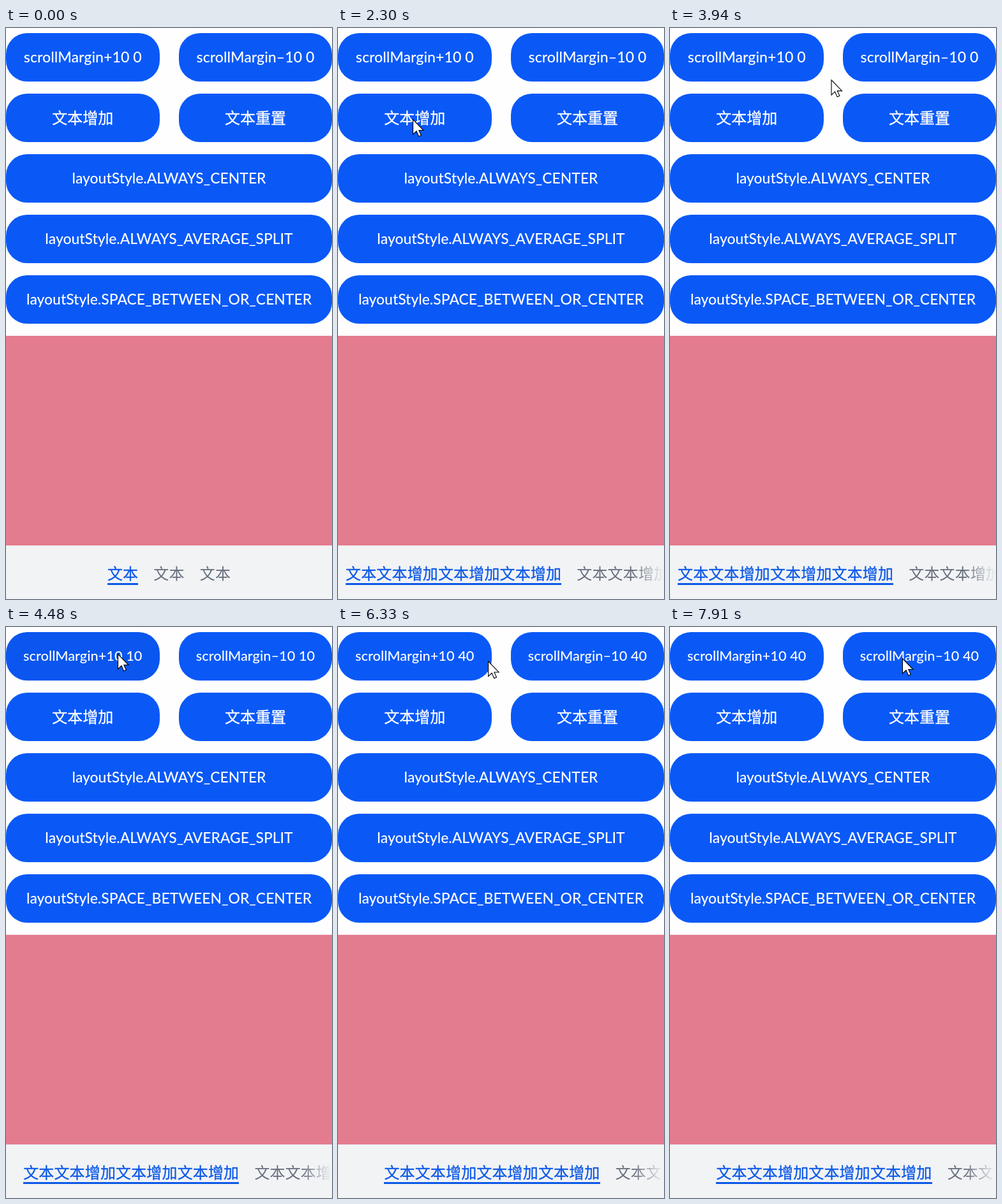
Animation of 511x896 px, one loop 8000 ms. Source, as an HTML page:

```html
<!DOCTYPE html>
<html lang="zh-CN">
<head>
<meta charset="utf-8">
<title>Tab bar demo</title>
<style>
  html, body { margin: 0; width: 100%; height: 100%; overflow: hidden; }
  body { position: relative; background: #fefefe; font: 500 22.9px Lato, "Noto Sans CJK SC", "Noto Sans CJK", sans-serif; }
  .stage { position: absolute; left: 0; top: 0; width: 511px; height: 896px; overflow: hidden; }
  .buttons { position: absolute; top: 7.8px; width: 511px; display: grid; grid-template-columns: 240.5px 240px; column-gap: 30.5px; grid-auto-rows: 76.5px; row-gap: 18.5px; }
  .button { display: flex; align-items: center; justify-content: center; box-sizing: border-box; padding-bottom: 3px; border-radius: 33px; background: #0a59f7; color: #fff; white-space: pre; }
  .wide { grid-column: span 2; }
  .cjk, .tabs { font-family: "Noto Sans CJK SC", "Noto Sans CJK", sans-serif; font-size: 24px; }
  .cjk, .tabs span:first-child { -webkit-text-stroke: .3px; }
  .pressed { background: #0a56ee; }
  .panel { position: absolute; top: 483.3px; width: 511px; height: 329px; background: #e47c90; }
  .bar { position: absolute; top: 812.3px; width: 511px; height: 84px; background: #f1f3f5; overflow: hidden; }
  .bar.scrolls::after { content: ""; position: absolute; right: 0; top: 0; width: 48px; height: 100%; background: linear-gradient(90deg, #f1f3f500, #f1f3f5); }
  .tabs { position: absolute; left: 0; top: 24.7px; display: flex; gap: 24.15px; line-height: 36px; letter-spacing: .15px; white-space: nowrap; color: #666d7b; font-weight: 400; }
  .tabs span { position: relative; }
  .tabs span:first-child { color: #0b58e8; font-weight: 500; }
  .tabs span:first-child::after { content: ""; position: absolute; left: 0; right: 0; top: 34.5px; height: 3px; background: #0b58e8; }
  .cursor { position: absolute; left: 0; top: 0; width: 20px; height: 30px; overflow: visible; }
</style>
</head>
<body>
<div class="stage">
  <div class="buttons">
    <div class="button" id="plus"></div>
    <div class="button" id="minus"></div>
    <div class="button cjk" id="add">文本增加</div>
    <div class="button cjk">文本重置</div>
    <div class="button wide">layoutStyle.ALWAYS_CENTER</div>
    <div class="button wide">layoutStyle.ALWAYS_AVERAGE_SPLIT</div>
    <div class="button wide">layoutStyle.SPACE_BETWEEN_OR_CENTER</div>
  </div>
  <div class="panel"></div>
  <div class="bar" id="bar">
    <div class="tabs" id="tabs"><span></span><span></span><span></span></div>
  </div>
  <svg class="cursor" id="cursor">
    <path d="M.5 .5V24L6 18.8L9.6 27L13.4 25.4L9.8 17.5H17Z" fill="#fff" stroke="#000" stroke-width="1.1"/>
  </svg>
</div>
<script>
  const LOOP = 8000, STEP = 84, WIDTH = 511;
  const VP = 1.509, CHAR = 24.15;
  const $ = id => document.getElementById(id);

  // Pointer moves: start, end, from, to, downward bow of the path
  const moves = [
    [70, 1070, [370, 758], [117, 143], 0],
    [2300, 3330, [117, 143], [389, 150], 0],
    [3400, 4250, [389, 150], [175, 42], 0],
    [6070, 6740, [175, 42], [364, 49], 11]
  ];
  const addClicks = [1450, 1720, 2000];
  const addPresses = [[1220, 1450], [1590, 1720], [1860, 2000]];
  const marginClicks = [4480, 4900, 5320, 5740];
  const marginPresses = marginClicks.map(t => [t, t + 170]);

  const count = (times, t) => times.filter(c => t >= c).length;
  const within = (spans, t) => spans.some(([a, b]) => t >= a && t < b);
  const ease = p => p * p * (3 - 2 * p);

  function pointer(t) {
    const move = moves.filter(m => t >= m[0]).pop();
    if (!move) return null;
    const [start, end, from, to, bow] = move;
    if (t >= end) return to;
    const p = ease(Math.floor((t - start) / STEP) * STEP / (end - start));
    const [x, y] = from.map((v, i) => v + (to[i] - v) * p);
    return [x, y + bow * Math.sin(Math.PI * p)];
  }

  function setText(el, text) {
    if (el.textContent !== text) el.textContent = text;
  }

  function drawTabs(added, margin) {
    const text = "文本" + "文本增加".repeat(added);
    const total = 3 * text.length * CHAR + 2 * CHAR;
    const scrolls = total + 16 * VP > WIDTH;
    const x = scrolls ? (8 + margin) * VP : (WIDTH - total) / 2;
    for (const tab of $("tabs").children) setText(tab, text);
    $("tabs").style.left = x + "px";
    $("bar").classList.toggle("scrolls", scrolls);
  }

  function drawButtons(margin, t) {
    for (const [id, sign] of [["plus", "+"], ["minus", "–"]]) {
      setText($(id), `scrollMargin${sign}10 ${margin}`);
      $(id).style.fontSize = margin ? "21.8px" : "23.2px";
    }
    $("plus").classList.toggle("pressed", within(marginPresses, t));
    $("add").classList.toggle("pressed", within(addPresses, t));
  }

  function draw(t) {
    const margin = 10 * count(marginClicks, t);
    drawButtons(margin, t);
    drawTabs(count(addClicks, t), margin);
    const pos = pointer(t);
    $("cursor").style.display = pos ? "block" : "none";
    if (pos) $("cursor").style.transform = `translate(${pos[0]}px, ${pos[1]}px)`;
  }

  const begin = performance.now();
  function tick() {
    draw((performance.now() - begin) % LOOP);
    requestAnimationFrame(tick);
  }
  tick();
</script>
</body>
</html>
```
